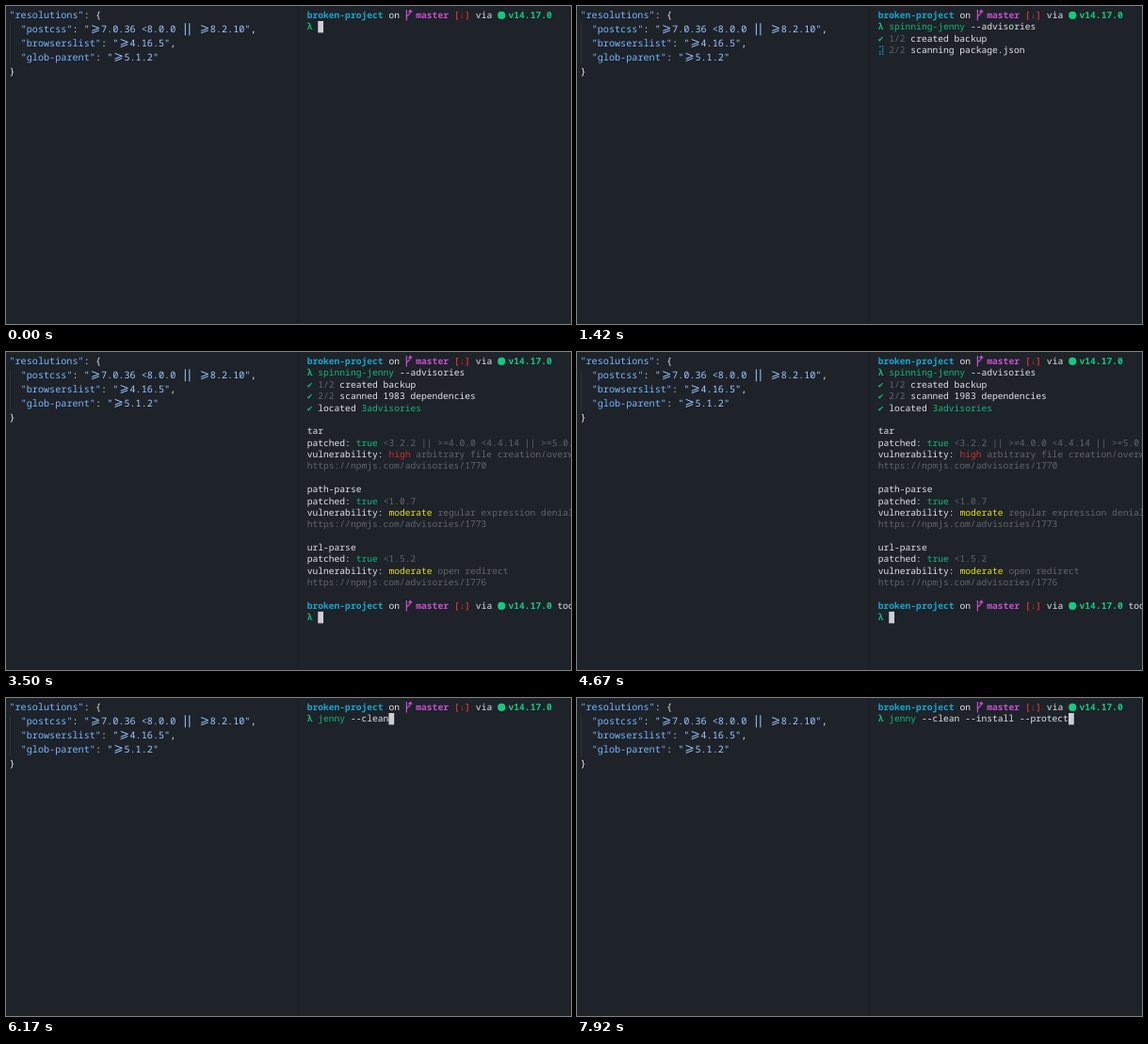
Write an HTML page that moves like this. It is 600 px wide and 338 px high and loops after 8 s.

```html
<!DOCTYPE html>
<html lang="en">
<head>
<meta charset="utf-8">
<title>Terminal session</title>
<style>
  html, body { margin: 0; width: 100%; height: 100%; overflow: hidden; background: #1e2229; }
  svg { display: block; width: 100vw; height: 100vh; }
  text {
    font-family: "Noto Sans Mono", "DejaVu Sans Mono", "DejaVu Sans", monospace;
    font-weight: 500;
    font-variant-ligatures: none;
    text-rendering: geometricPrecision;
    white-space: pre;
  }
  #editor text { font-size: 10.17px; }
  #term text { font-size: 9.633px; }
  #term text.b { font-weight: 600; }
</style>
</head>
<body>
<svg viewBox="0 0 600 338">
  <rect width="600" height="338" fill="#1e2229"/>
  <rect x="308" width="4" height="338" fill="#1c2027"/>
  <g id="editor"></g>
  <g id="term"></g>
</svg>
<script>
const LOOP = 8000, FRAME = 1000 / 12;
const C = {
  bg: '#1e2229', fg: '#e1e4e8', dim: '#62666b', cursor: '#ccd0d6',
  cyan: '#14a8cd', green: '#0dbc79', lime: '#10cc80', pink: '#c750cf',
  red: '#cd3131', yellow: '#e5e510', key: '#79b8ff', str: '#9ecbff'
};

const esc = s => s.replace(/&/g, '&amp;').replace(/</g, '&lt;');
const label = (s, x, y, color, bold) =>
  `<text x="${x.toFixed(2)}" y="${y.toFixed(2)}" fill="${color}"${bold ? ' class="b"' : ''}>${esc(s)}</text>`;

// A grid of character cells; row() lays out [text, colour, bold] runs.
function grid(x0, base, w, h) {
  const x = col => x0 + col * w;
  const y = line => base + line * h;
  const row = (line, runs, col = 0) => runs.map(([s, color, bold]) => {
    const out = s.trim() ? label(s, x(col), y(line), color, bold) : '';
    col += s.length;
    return out;
  }).join('');
  return { x, y, w, h, row };
}

// Editor pane
const ed = grid(3.45, 13.4, 6.1, 14.85);

const atLeast = (line, col) =>
  `<path d="M${ed.x(col) + 2.4} ${ed.y(line) - 7.6}l7.6 2.9l-7.6 2.9m0 2.3l7.6 -2.9" fill="none" stroke="${C.str}"/>`;
const bars = (line, col) =>
  `<path d="M${ed.x(col) + 3.9} ${ed.y(line) - 10}v13m4.5 0v-13" fill="none" stroke="${C.str}"/>`;
const entry = (line, key, value, tail) =>
  ed.row(line, [[`"${key}"`, C.key], [': ', C.fg], [`"${value}"`, C.str], [tail, C.fg]], 2);

document.getElementById('editor').innerHTML =
  `<path d="M4.5 18V62" stroke="#2d323a"/>` +
  ed.row(0, [['"resolutions"', C.key], [': {', C.fg]]) +
  entry(1, 'postcss', '  7.0.36 <8.0.0      8.2.10', ',') +
  entry(2, 'browserslist', '  4.16.5', ',') +
  entry(3, 'glob-parent', '  5.1.2', '') +
  ed.row(4, [['}', C.fg]]) +
  atLeast(1, 14) + bars(1, 30) + atLeast(1, 33) + atLeast(2, 19) + atLeast(3, 18);

// Terminal pane
const tm = grid(319.7, 13, 5.78, 12.38);

function prompt(line, took) {
  const y = tm.y(line), x = tm.x(18);
  return tm.row(line, [
    ['broken-project', C.cyan, 1], [' on   ', C.fg], ['master', C.pink, 1], [' ', C.fg],
    ['[↓]', C.red, 1], [' via   ', C.fg], ['v14.17.0', C.lime, 1], [took ? ' took 2s' : '', C.fg]
  ]) +
  `<path d="M${x + 1.6} ${y - 9}v11.5m0 -3.5c0 -3 4 -2 4 -5.5v-1.5m-1.9 1.6l1.9 -2.2l1.9 2.2" fill="none" stroke="${C.pink}" stroke-width="1.2"/>` +
  `<circle cx="526.2" cy="${y - 3.1}" r="4.1" fill="${C.lime}"/>` +
  tm.row(line + 1, [['λ', C.green, 1]]);
}

function cursor(line, col, under = '') {
  return `<rect x="${tm.x(col)}" y="${tm.y(line) - 9.4}" width="${tm.w}" height="${tm.h}" fill="${C.cursor}"/>` +
    tm.row(line, [[under, C.bg]], col);
}

// Typed command with the shell's dim history suggestion after it.
function command(line, cmd, n, hint, showCursor) {
  const typed = cmd.slice(0, n), word = cmd.split(' ')[0];
  const head = typed.slice(0, word.length), tail = typed.slice(word.length);
  const rest = n && hint.startsWith(typed) ? hint.slice(n) : '';
  return tm.row(line, [
    [head, head === word ? C.green : C.red], [tail, C.fg], [' ', C.fg], [rest.slice(1), C.dim]
  ], 2) + (showCursor ? cursor(line, 2 + n, rest.slice(0, 1)) : '');
}

const done = (line, step, text) =>
  tm.row(line, [['✔ ', C.green], [step, C.dim], [text, C.fg]]);

function advisory(line, name, range, level, color, about, id) {
  return tm.row(line, [[name, C.fg]]) +
    tm.row(line + 1, [['patched: ', C.fg], ['true', C.green], [' ' + range, C.dim]]) +
    tm.row(line + 2, [['vulnerability: ', C.fg], [level, color], [' ' + about, C.dim]]) +
    tm.row(line + 3, [['https://npmjs.com/advisories/' + id, C.dim]]);
}

const report =
  done(4, '', 'located ') + tm.row(4, [['3advisories', C.green]], 10) +
  advisory(6, 'tar', '<3.2.2 || >=4.0.0 <4.4.14 || >=5.0.0', 'high', C.red, 'arbitrary file creation/overwrite', 1770) +
  advisory(11, 'path-parse', '<1.0.7', 'moderate', C.yellow, 'regular expression denial of service', 1773) +
  advisory(16, 'url-parse', '<1.5.2', 'moderate', C.yellow, 'open redirect', 1776);

const SCAN = 'spinning-jenny --advisories';
const FIX = 'jenny --clean --install --protect';
const HINT = 'jenny -c -i -p -i';
const SPIN = '⣾⣽⣻⢿⡿⣟⣯⣷';

const T = { type: 325, accept: 665, enter: 830, backup: 1080, scanned: 1910, report: 2165, prompt: 2745, clear: 4825, retype: 5075 };
const keys = (t, from, max) => Math.max(0, Math.min(max, Math.floor((t - from) / FRAME)));

function scene(t) {
  if (t >= T.clear)
    return prompt(0) + command(1, FIX, keys(t, T.retype, FIX.length), HINT, true);

  const n = t >= T.accept ? SCAN.length : keys(t, T.type - FRAME, 4);
  let out = prompt(0) + command(1, SCAN, n, SCAN, t < T.enter);
  if (t >= T.enter && t < T.backup) out += cursor(2, 0);
  if (t >= T.backup) {
    out += done(2, '1/2', ' created backup');
    if (t < T.scanned) {
      const glyph = SPIN[Math.floor(t / FRAME) % SPIN.length];
      out += tm.row(3, [[glyph, C.cyan]]) +
        tm.row(3, [['2/2', C.dim], [' scanning package.json', C.fg]], 2);
    } else {
      out += done(3, '2/2', ' scanned 1983 dependencies');
    }
  }
  if (t >= T.report) out += report;
  if (t >= T.prompt) out += prompt(21, true) + cursor(22, 2);
  else if (t >= T.report) out += cursor(20, 0);
  return out;
}

const term = document.getElementById('term');
const start = performance.now();
let shown = '';

function draw() {
  const next = scene((performance.now() - start) % LOOP);
  if (next !== shown) term.innerHTML = shown = next;
  requestAnimationFrame(draw);
}
draw();
</script>
</body>
</html>
```
